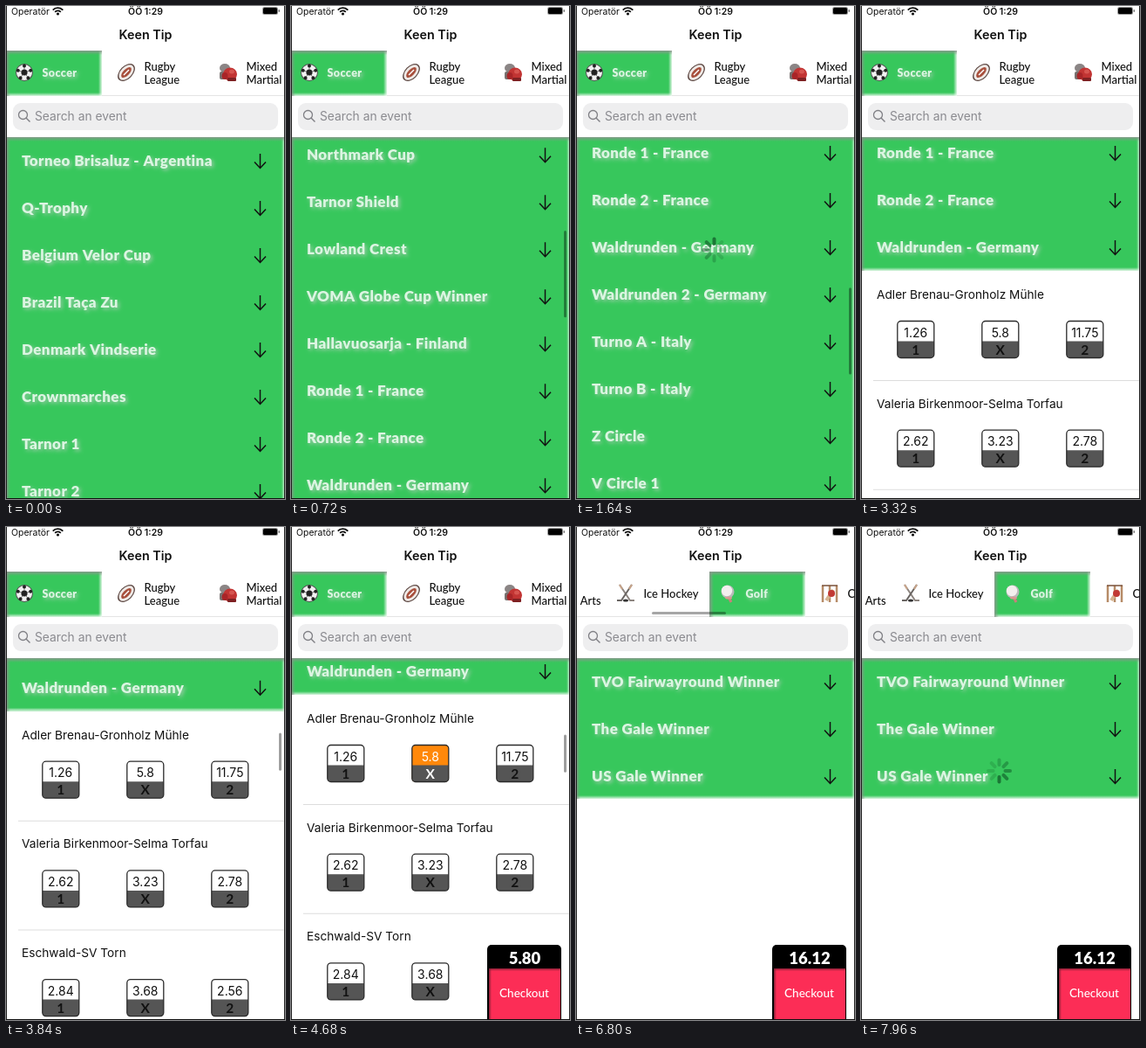
Animation of 320x564 px, one loop 8000 ms. Source, as an HTML page with a canvas:

```html
<!DOCTYPE html>
<html lang="en">
<head>
<meta charset="utf-8">
<title>Keen Tip</title>
<style>
html, body { margin: 0; width: 100%; height: 100%; overflow: hidden; background: #fff; }
canvas { display: block; }
</style>
</head>
<body>
<canvas id="stage" width="320" height="564"></canvas>
<script>
const c = document.getElementById('stage').getContext('2d');
const LOOP = 8000, TOP = 150, BOTTOM = 564, ROW = 54, MATCH = 125, OPEN_ROW = 15;
const ROW_COUNT = 32, MATCH_COUNT = 18, VIEW = BOTTOM - TOP;
const GREEN = '#37c75c', PALE = '#dcf5e2';
const lato = (size, weight) => `${weight} ${size}px Lato, sans-serif`;
const inter = (size, weight = 400) => `${weight} ${size}px Inter, sans-serif`;

const leagues = ['Torneo Brisaluz - Argentina', 'Q-Trophy', 'Belgium Velor Cup', 'Brazil Taça Zu',
  'Denmark Vindserie', 'Crownmarches', 'Tarnor 1', 'Tarnor 2', 'Northmark Cup', 'Tarnor Shield',
  'Lowland Crest', 'VOMA Globe Cup Winner', 'Hallavuosarja - Finland', 'Ronde 1 - France',
  'Ronde 2 - France', 'Waldrunden - Germany', 'Waldrunden 2 - Germany', 'Turno A - Italy',
  'Turno B - Italy', 'Z Circle', 'V Circle 1'];
const golfEvents = ['TVO Fairwayround Winner', 'The Gale Winner', 'US Gale Winner'];
const matches = [
  ['Adler Brenau-Gronholz Mühle', 1.26, 5.8, 11.75],
  ['Valeria Birkenmoor-Selma Torfau', 2.62, 3.23, 2.78],
  ['Eschwald-SV Torn', 2.84, 3.68, 2.56]
];
const tabs = [
  ['Soccer', ball], ['Rugby\nLeague', rugby], ['Mixed\nMartial Arts', gloves],
  ['Ice Hockey', hockey], ['Golf', golf], ['Cricket', cricket]
];

const ramp = (t, a, b) => Math.min(1, Math.max(0, (t - a) / (b - a)));

function text(s, x, y, font, color, align = 'left', glow = false) {
  c.save();
  c.font = font;
  c.fillStyle = color;
  c.textAlign = align;
  if (glow) {
    c.letterSpacing = '.4px';
    c.shadowColor = 'rgba(195,205,197,.75)';
    c.shadowBlur = 4;
    c.shadowOffsetX = c.shadowOffsetY = 2;
  }
  c.fillText(s, x, y);
  c.restore();
}

function rect(x, y, w, h, color, radius = 0) {
  c.fillStyle = color;
  c.beginPath();
  c.roundRect(x, y, w, h, radius);
  c.fill();
}

function oval(x, y, rx, ry, color, angle = 0) {
  c.fillStyle = color;
  c.beginPath();
  c.ellipse(x, y, rx, ry, angle, 0, 7);
  c.fill();
}

function line(color, width, ...p) {
  c.strokeStyle = color;
  c.lineWidth = width;
  c.beginPath();
  for (let i = 0; i < p.length; i += 2) c.lineTo(p[i], p[i + 1]);
  c.stroke();
}

// Fades a strip from the given tone at (x, y) to nothing at (x + dx, y + dy)
function shade(x, y, w, h, dx, dy, tone = '140,150,142') {
  const g = c.createLinearGradient(dx < 0 ? x + w : x, dy < 0 ? y + h : y,
    dx < 0 ? x + w + dx : x + dx, dy < 0 ? y + h + dy : y + dy);
  g.addColorStop(0, `rgba(${tone},.9)`);
  g.addColorStop(1, `rgba(${tone},0)`);
  c.fillStyle = g;
  c.fillRect(x, y, w, h);
}

function panel(x, y, w, h) {
  rect(x, y, w, h, GREEN);
  shade(x + w - 4, y, 4, h, -4, 0, '240,250,242');
  shade(x, y + h - 4, w, 4, 0, -4, '240,250,242');
  shade(x, y, 5, h, 5, 0);
  shade(x, y, w, 5, 0, 5);
}

// Sport icons, drawn around the origin
function ball() {
  oval(0, 0, 10, 10, '#555');
  oval(0, 0, 9, 9, '#f1f1f1');
  oval(0, 0, 3.6, 3.6, '#222');
  for (let i = 0; i < 5; i++) {
    const a = i * Math.PI * .4 - Math.PI / 2, x = Math.cos(a), y = Math.sin(a);
    line('#666', .8, x * 3, y * 3, x * 7, y * 7);
    oval(x * 7.6, y * 7.6, 2, 2, '#222');
  }
}
function rugby() {
  oval(0, 0, 12, 7.5, '#5f4a45', -.8);
  oval(0, 0, 10.5, 6.3, '#efeae7', -.8);
  oval(0, 0, 7.5, 3.6, '#a8503d', -.8);
  line('#fff', 1.4, -3, 3, 3, -3);
}
function gloves() {
  oval(-4, -5, 6, 5, '#8b8585');
  rect(-10, -1, 6, 9, '#77716f', 2);
  oval(2, 2, 8, 7.5, '#c23433');
  oval(-4, 4, 3.5, 4, '#a82528');
  rect(-1, 6, 10, 4, '#7e2022', 1);
  oval(4, -1, 3, 2.5, '#d65550');
}
function hockey() {
  line('#8d8580', 2, -7, -10, 5, 8, 10, 8);
  line('#696562', 2, 7, -10, -5, 8, -10, 8);
  line('#c9a58a', 2, -7, -10, -4, -5);
  line('#c9a58a', 2, 7, -10, 4, -5);
  oval(0, 8, 3, 1.6, '#333');
}
function golf() {
  line('#c9807c', 3, 1, 4, 4, 10);
  oval(0, -2, 7.5, 7.5, '#b9b9b9');
  oval(-1, -3, 6.2, 6.2, '#f3efee');
  oval(1, 5, 4, 1.5, '#d99a94');
}
function cricket() {
  for (let x = -8; x < 9; x += 8) line('#b68b67', 2.5, x, -9, x, 10);
  line('#7a5038', 1.5, -9, -9, 9, -9);
  line('#d6b48f', 4, 4, -4, -4, 8);
  oval(2, 0, 4, 4, '#c23a35');
}

function listRow(name, y) {
  text(name, 18, y + 6, lato(17, 900), PALE, 'left', true);
  line('#111', 1.5, 291.5, y - 8, 291.5, y + 8);
  line('#111', 1.5, 285, y + 1.5, 291.5, y + 8.5, 298, y + 1.5);
}

function odds(value, sign, x, y, chosen) {
  const draw = (paper, ink, signInk) => {
    rect(x, y, 42, 42, paper, 4);
    rect(x, y + 23, 42, 19, '#555', [0, 0, 4, 4]);
    text(value, x + 21, y + 18, inter(14), ink, 'center');
    text(sign, x + 21, y + 38, lato(15.5, 700), signInk, 'center');
  };
  draw('#fff', '#111', '#111');
  if (chosen) {
    c.save();
    c.globalAlpha = chosen;
    draw('#ff880a', '#fff', '#fff');
    c.restore();
  }
  c.strokeStyle = '#2b2b2b';
  c.lineWidth = 1.3;
  c.beginPath();
  c.roundRect(x, y, 42, 42, 4);
  c.stroke();
}

function soccerList(t, picks) {
  const fling = 1 - (1 - ramp(t, 40, 1470) ** 1.3) ** 2;
  const drag = 1 - (1 - ramp(t, 3580, 3930)) ** 1.3;
  const offset = 711 * fling + 111 * drag;
  const gap = MATCH * MATCH_COUNT * ramp(t, 2480, 3160) ** 3;
  const cut = TOP + (OPEN_ROW + 1) * ROW - offset;

  if (gap) matches.forEach(([name, ...values], i) => {
    const y = cut + MATCH * i - i * .3;
    text(name, 18, y + 32, inter(13.7), '#111');
    values.forEach((v, k) => odds(v, '1X2'[k], 41.8 + 97 * k, y + 57.5, picks[i + '' + k]));
    rect(14, y + 125, 306, 1, '#ddd');
  });
  panel(0, TOP, 320, (gap ? cut : BOTTOM + 4) - TOP);
  if (gap && cut + gap < BOTTOM) panel(0, cut + gap, 320, BOTTOM + 4 - cut - gap);
  leagues.forEach((name, i) => {
    const y = TOP + 27 + ROW * i - offset + (i > OPEN_ROW ? gap : 0);
    if (y > TOP - 30 && y < BOTTOM + 30) listRow(name, y);
  });

  const shown = t < 3600 ? (t >= 40) * (1 - ramp(t, 2480, 2800)) : 1 - ramp(t, 5360, 5640);
  const content = ROW * ROW_COUNT + (t < 2480 ? 0 : MATCH * MATCH_COUNT);
  rect(313, 152 + offset / content * VIEW, 3, VIEW * VIEW / content, `rgba(0,0,0,${.38 * shown})`, 1.5);
}

function golfList() {
  panel(0, TOP, 320, ROW * 3 - 1);
  golfEvents.forEach((name, i) => listRow(name, TOP + 27 + ROW * i));
}

function statusBar() {
  text('Operatör', 6, 10, inter(10.5), '#111');
  text('ÖÖ 1:29', 160, 10, inter(10.5, 600), '#111', 'center');
  oval(59.5, 9, 1.6, 1.6, '#111');
  c.strokeStyle = '#111';
  c.lineWidth = 1.8;
  for (const r of [4.5, 7.8]) {
    c.beginPath();
    c.arc(59.5, 10, r, -2.4, -.74);
    c.stroke();
  }
  rect(294, 1, 18, 9, '#999', 2.5);
  rect(295, 2, 16, 7, '#000', 1.5);
  rect(312.5, 4, 1.5, 3, '#777', 1);
}

function header(t) {
  rect(0, 0, 320, TOP, '#fff');
  statusBar();
  text('Keen Tip', 160, 38, inter(14.3, 600), '#111', 'center');

  const shift = 315 * (1 - (1 - ramp(t, 6000, 6560)) ** 2.85);
  const selected = t < 6800 ? 0 : 4;
  rect(0, 102, 320, 1, '#e4e4e4');
  tabs.forEach(([label, icon], i) => {
    const x = 117 * i - shift, on = i === selected;
    if (on) panel(x, 51, 110, 52);
    c.save();
    c.translate(x + 21, 76);
    icon();
    c.restore();
    const lines = label.split('\n');
    lines.forEach((s, k) => text(s, x + 41.5, 81 + 15 * (k - (lines.length - 1) / 2),
      lato(on ? 12.5 : 13, on ? 900 : 500), on ? PALE : '#111', 'left', on));
  });
  if (t >= 6000) rect(3 + shift * 320 / 1200, 97, 85, 3, `rgba(0,0,0,${.35 * (1 - ramp(t, 6800, 7080))})`, 1.5);

  rect(8, 111, 304, 31, '#eeeeef', 9);
  c.strokeStyle = '#808085';
  c.lineWidth = 1.3;
  c.beginPath();
  c.arc(19.5, 124.5, 5, 0, 7);
  c.stroke();
  line('#808085', 1.4, 23, 128, 27.5, 132.5);
  text('Search an event', 33, 131, inter(13.8), '#8a8a8f');
}

function spinner(elapsed) {
  const head = Math.floor(elapsed / 125);
  c.save();
  c.translate(158.5, 279);
  c.lineCap = 'round';
  for (let i = 0; i < 8; i++) {
    const age = (head - i + 800) % 8;
    line(`rgba(10,70,30,${Math.max(.18, .62 - age * .09)})`, 4, 0, -7, 0, -12.5);
    c.rotate(Math.PI / 4);
  }
  c.restore();
}

function checkout(alpha, total) {
  c.save();
  c.globalAlpha = alpha;
  rect(225, 478, 85, 86, '#000', [5, 5, 0, 0]);
  rect(227, 505, 82, 58, '#fc2d56');
  shade(227, 505, 82, 3, 0, 3, '120,30,50');
  shade(227, 505, 3, 58, 3, 0, '120,30,50');
  text(total.toFixed(2), 268, 500, lato(18.5, 900), '#fff', 'center');
  text('Checkout', 267.5, 538, lato(13.5, 500), '#fff', 'center');
  c.restore();
}

function frame() {
  const t = performance.now() % LOOP;
  const picks = { '01': ramp(t, 4440, 4680), '12': ramp(t, 5320, 5640) };
  rect(0, 0, 320, BOTTOM, '#fff');
  if (t < 6800) soccerList(t, picks);
  else golfList();
  header(t);
  if (t >= 1640 && t < 2480) spinner(t - 1640);
  if (t >= 7440) spinner(t - 7440);
  if (t >= 4480) checkout(picks['01'], t < 5360 ? 5.8 : 5.8 * 2.78);
  rect(0, 0, 1, BOTTOM, '#222');
  rect(319, 0, 1, BOTTOM, '#222');
  rect(0, 563, 320, 1, '#111');
  requestAnimationFrame(frame);
}
frame();
</script>
</body>
</html>
```
